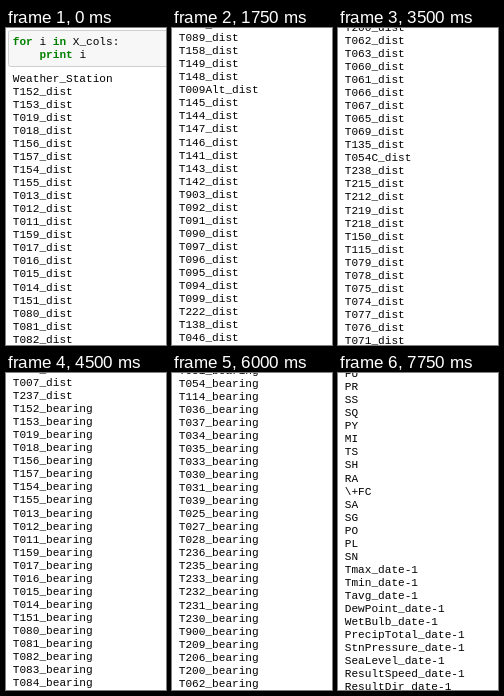
Recreate the animation shown at these times as an HTML page with a canvas. Size 160 by 317 pixels, loop 8000 ms.

```html
<!DOCTYPE html>
<html lang="en">
<head>
<meta charset="utf-8">
<title>Column listing</title>
<style>
  html, body { margin: 0; width: 100%; height: 100%; overflow: hidden; background: #fff; }
  canvas { display: block; width: 160px; height: 317px; }
</style>
</head>
<body>
<canvas id="stage"></canvas>
<script>
const W = 160, H = 317, LOOP = 8000, STEP = 250;
const PITCH = 13.04, LEFT = 6.8, SIZE = 11.1;
const FONT = SIZE + 'px "Liberation Mono", "Courier New", monospace';

const words = text => text.trim().split(/\s+/);

const traps = words(`
  152 153 019 018 156 157 154 155 013 012 011 159 017 016 015 014 151
  080 081 082 083 084 085 086 088 089 158 149 148 009Alt 145 144 147 146
  141 143 142 903 092 091 090 097 096 095 094 099 222 138 046
  047 044 045 043 040 048 049 223 221 220 227 226 225 224 229 228
  128 129 050 051 054 114 036 037 034 035 033 030 031 039 025 027 028
  236 235 233 232 231 230 900 209 206 200
  062 063 060 061 066 067 065 069 135 054C 238 215 212 219 218 150 115
  079 078 075 074 077 076 071 070 073 072 094B 100 103 102 107 008 009
  162 161 160 001 002 003 004 005 006 007 237`);

const weather = words(`Tmax Tmin Tavg DewPoint WetBulb PrecipTotal
  StnPressure SeaLevel ResultSpeed ResultDir AvgSpeed`);

const codes = words(`BC BL GS VA FG DU DS GR DR DZ FZ VC BR HZ IC UP FC
  FU PR SS SQ PY MI TS SH RA \\+FC SA SG PO PL SN`);

const rows = [
  'Weather_Station',
  ...traps.map(t => `T${t}_dist`),
  ...traps.map(t => `T${t}_bearing`),
  'Station', ...weather, ...codes,
  ...weather.map(name => name + '_date-1')
];

// Each key says which row sits at which height at a given time.
const keys = [
  [750, 'Weather_Station', 50.3],
  [1750, 'T089_dist', 9.6],
  [3500, 'T062_dist', 12.4],
  [4500, 'T007_dist', 9.5],
  [5250, 'T085_bearing', 3.6],
  [6750, 'T071_bearing', 3.8],
  [7750, 'FU', 0.6]
].map(([time, row, y]) => ({ time, top: rows.indexOf(row) * PITCH - y }));

function scrollAt(ms) {
  const t = Math.floor(ms / STEP) * STEP;
  if (t <= keys[0].time) return keys[0].top;
  const i = keys.findIndex(k => k.time >= t);
  const a = keys[i - 1], b = keys[i];
  return a.top + (b.top - a.top) * (t - a.time) / (b.time - a.time);
}

const canvas = document.getElementById('stage');
const ctx = canvas.getContext('2d');
const ratio = window.devicePixelRatio || 1;
canvas.width = Math.round(W * ratio);
canvas.height = Math.round(H * ratio);

function write(text, column, y, color = '#000', bold = false) {
  ctx.font = (bold ? 'bold ' : '') + FONT;
  ctx.fillStyle = color;
  ctx.fillText(text, LEFT + column * SIZE * 0.6, Math.round(y + 3.6));
}

function drawCell(shift) {
  ctx.fillStyle = '#f7f7f7';
  ctx.strokeStyle = '#cfcfcf';
  ctx.lineWidth = 1;
  ctx.beginPath();
  ctx.roundRect(2.5, 2.5 - shift, W + 10, 36, 2);
  ctx.fill();
  ctx.stroke();
  const green = '#008000';
  write('for', 0, 13 - shift, green, true);
  write('i', 4, 13 - shift);
  write('in', 6, 13 - shift, green, true);
  write('X_cols:', 9, 13 - shift);
  write('print', 4, 26.4 - shift, green, true);
  write('i', 10, 26.4 - shift);
}

function draw(ms) {
  const top = scrollAt(ms);
  const shift = top - keys[0].top;
  ctx.setTransform(ratio, 0, 0, ratio, 0, 0);
  ctx.fillStyle = '#fff';
  ctx.fillRect(0, 0, W, H);
  if (shift < 50) drawCell(shift);
  rows.forEach((row, i) => {
    const y = i * PITCH - top;
    if (y > -10 && y < H + 10) write(row, 0, y);
  });
}

const start = performance.now();
function tick() {
  draw((performance.now() - start) % LOOP);
  requestAnimationFrame(tick);
}
tick();
</script>
</body>
</html>
```
